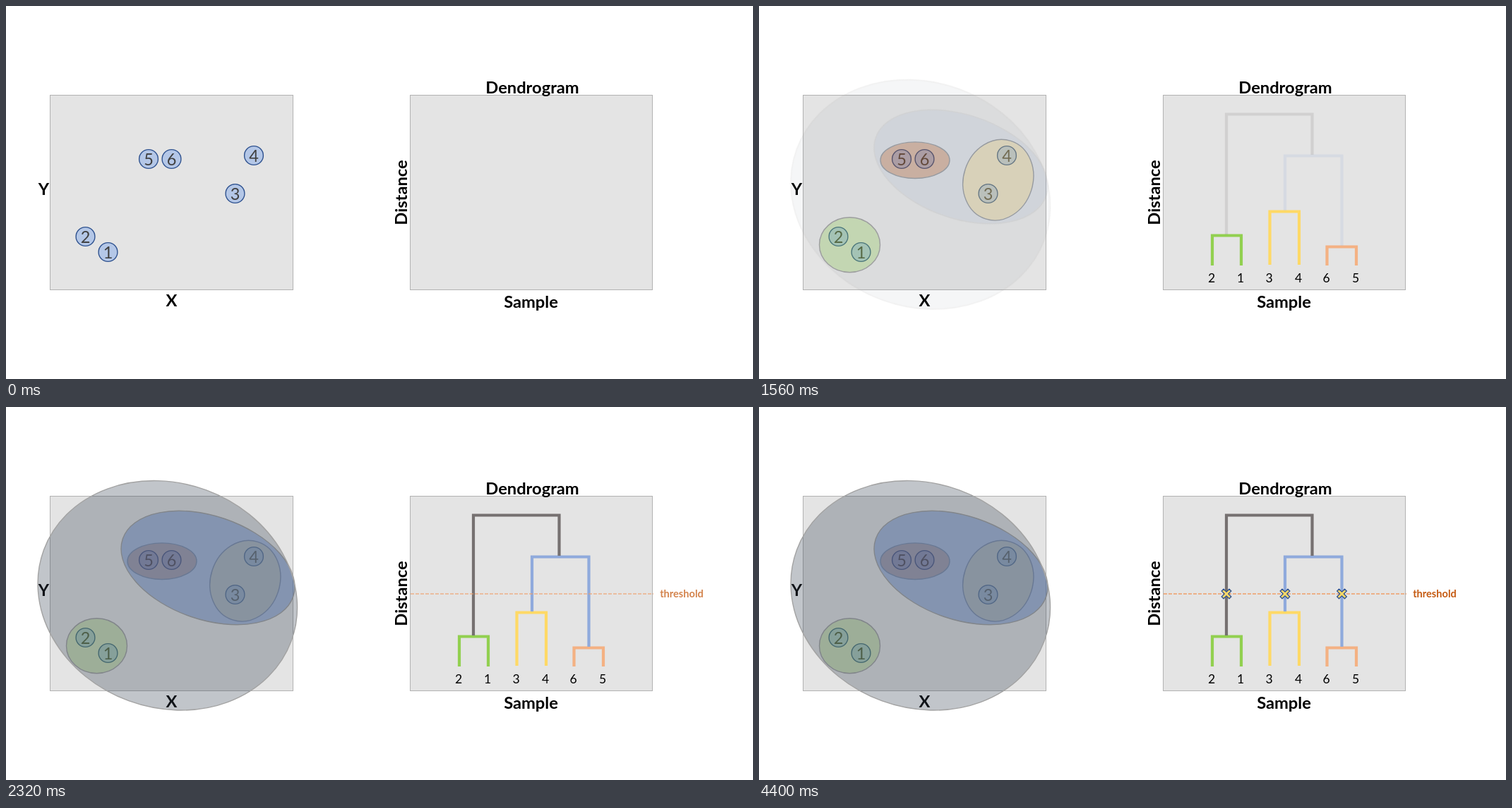
Animation, 1058 px wide and 529 px high, one loop 4.44 s. Source, as an HTML page:

```html
<!DOCTYPE html>
<html lang="en">
<head>
<meta charset="utf-8">
<title>Hierarchical clustering</title>
<style>
  html, body { margin: 0; width: 100%; height: 100%; overflow: hidden; background: #fff; }
  svg { display: block; width: 100%; height: 100%; }
  text { font-family: Lato, "Open Sans", sans-serif; text-anchor: middle; }
  .plot { fill: #e4e4e4; stroke: #b2b2b2; }
  .title { font-size: 23.7px; font-weight: 700; }
  .point circle { fill: #b4c7e7; stroke: #2f528f; stroke-width: 1.4; }
  .point text { font-size: 23.5px; fill: #404040; }
  .cluster { stroke: #a3a3a3; stroke-width: 1.4; }
  .branch { fill: none; stroke-width: 4.2; }
  .leaf { font-size: 17.5px; }
  .cut { fill: #ffd966; stroke: #2f528f; stroke-width: 1.3; }
</style>
</head>
<body>
<svg viewBox="0 0 1058 529">
  <rect class="plot" x="62.5" y="126.5" width="344" height="276"/>
  <rect class="plot" x="572.5" y="126.5" width="343" height="276"/>
  <g class="title">
    <text x="53.5" y="268">Y</text>
    <text x="234.5" y="425.5">X</text>
    <text x="745.5" y="124">Dendrogram</text>
    <text x="743.5" y="427.5">Sample</text>
    <text transform="translate(568 264.5) rotate(-90)">Distance</text>
  </g>
  <g id="points"></g>
  <g id="stages"></g>
  <g id="threshold">
    <path d="M573 265H917" stroke="#f0a06a" stroke-width="1.4" stroke-dasharray="5 2"/>
    <text x="957" y="270" font-size="14.6" font-weight="700" fill="#c55a11">threshold</text>
  </g>
  <g id="cuts"></g>
</svg>
<script>
const LOOP = 4440, FRAME = 40, START = 40, FADE = 480, SWIVEL = 1960;
const byId = id => document.getElementById(id);
const clamp = v => Math.min(1, Math.max(0, v));

// number, x, y
const points = [[1, 144.5, 349], [2, 112.5, 327], [3, 324.5, 266],
                [4, 351, 212], [5, 202, 217], [6, 234.5, 217]];
byId('points').innerHTML = points.map(([n, x, y]) =>
  `<g class="point"><circle cx="${x}" cy="${y}" r="13.4"/><text x="${x}" y="${y + 8.7}">${n}</text></g>`).join('');

// ellipse: cx, cy, rx, ry, angle; branch: left, right, top, left foot, right foot
const stages = [
  { step: 0, fill: '#92d050', alpha: .3, line: '#92d050', ellipse: [128.5, 338.7, 43, 39, 0],
    branch: [642, 683, 325.5, 368, 368], leaves: [2, 1] },
  { step: 1, fill: '#ffd966', alpha: .3, line: '#ffd966', ellipse: [338.8, 246.7, 49.1, 58.1, 18],
    branch: [723.5, 765, 291.5, 367, 367], leaves: [3, 4] },
  { step: 2, fill: '#c55a11', alpha: .3, line: '#f4b183', ellipse: [221, 218.7, 49, 25.8, 0],
    branch: [804.5, 846, 341.5, 368, 368], leaves: [6, 5] },
  { step: 3, fill: '#4472c4', alpha: .38, line: '#8faadc', ellipse: [286, 228, 127.5, 73.4, 18.8],
    branch: [745, 825.5, 212.5, 290, 340], leaves: [] },
  { step: 3, fill: '#333f50', alpha: .3, line: '#767171', ellipse: [228.8, 267.3, 186.8, 159.2, 20.2],
    branch: [662, 783.5, 153.5, 324, 211], leaves: [] }
];
byId('stages').innerHTML = stages.map(({ fill, alpha, line, ellipse, branch, leaves }) => {
  const [cx, cy, rx, ry, angle] = ellipse;
  const [left, right, top, leftFoot, rightFoot] = branch;
  return `<g>
    <ellipse class="cluster" rx="${rx}" ry="${ry}" fill="${fill}" fill-opacity="${alpha}"
      transform="translate(${cx} ${cy}) rotate(${angle})"/>
    <path class="branch" stroke="${line}" d="M${left} ${leftFoot}V${top}H${right}V${rightFoot}"/>
    ${leaves.map((n, i) => `<text class="leaf" x="${branch[i] - .8}" y="392">${n}</text>`).join('')}
  </g>`;
}).join('');

const cutXs = [662, 745, 825.5];
const cross = 'M0-2.8 4-6.8 6.8-4 2.8 0 6.8 4 4 6.8 0 2.8-4 6.8-6.8 4-2.8 0-6.8-4-4-6.8Z';
byId('cuts').innerHTML = cutXs.map(() => `<path class="cut" d="${cross}"/>`).join('');

const stageNodes = [...byId('stages').children];
const cutNodes = [...byId('cuts').children];

function draw(now) {
  const time = Math.floor(now % LOOP / FRAME) * FRAME;
  const fade = step => clamp((time - START - step * FADE) / FADE);
  stages.forEach((stage, i) => stageNodes[i].setAttribute('opacity', fade(stage.step)));
  byId('threshold').setAttribute('opacity', fade(4));

  // the crosses swivel about their vertical axis while they fade in
  const progress = clamp((time - START - 5 * FADE) / SWIVEL);
  const width = Math.sin(2.5 * Math.PI * progress);
  byId('cuts').setAttribute('opacity', progress);
  cutNodes.forEach((node, i) =>
    node.setAttribute('transform', `translate(${cutXs[i]} 265) scale(${width} 1)`));
}

const begin = performance.now();
function tick() {
  draw(performance.now() - begin);
  requestAnimationFrame(tick);
}
tick();
</script>
</body>
</html>
```
